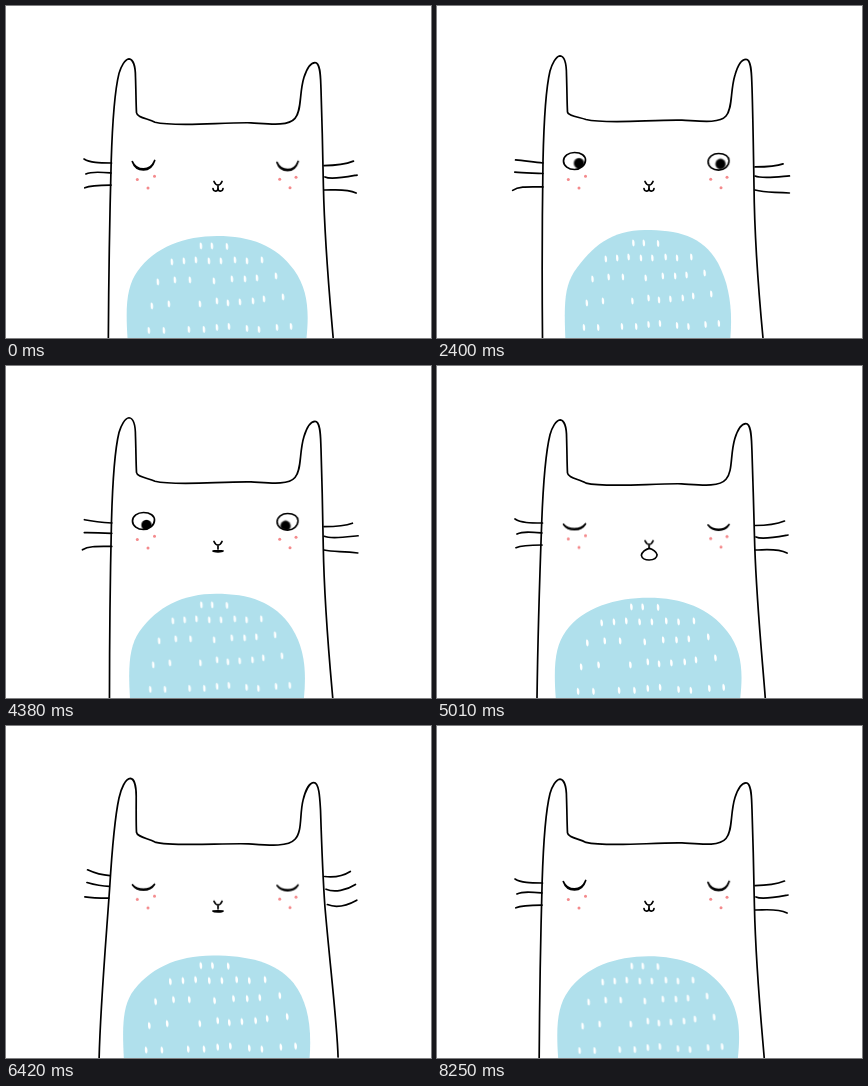
An HTML page without scripts for the animation above (8280 ms loop, 425 by 332 pixels).

```html
<!DOCTYPE html>
<html lang="en">
<head>
<meta charset="utf-8">
<title>Sleepy cat</title>
<style>
html, body { margin: 0; width: 100%; height: 100%; overflow: hidden; background: #fff; }
svg { display: block; width: 100vw; height: 100vh; }
.line { fill: none; stroke: #000; stroke-width: 1.7; stroke-linecap: round; stroke-linejoin: round; }
.open { fill: #fff; }
.pink { fill: #f48a8c; }

.body, .belly, .marks, .whiskers { animation: 8280ms ease-in-out -280ms infinite; }
.body { animation-name: body; }
.belly { animation-name: belly; fill: #b0e0ec; }
.marks { animation-name: marks; transform-origin: 212px 330px; }
.marks path { fill: none; marker: url(#drop); }
.whiskers { animation-name: whiskers; animation-delay: -130ms; }
.lid, .pupil, .side, .nose, .mouth, .smile { animation: 8280ms ease-in-out infinite; }
.lid { animation-name: lid; }
.left .pupil { animation-name: gaze-left; }
.right .pupil { animation-name: gaze-right; }
.side, .nose { animation-name: lift; }
.left { --up: -7px; }
.right { --up: -9px; }
.nose { --up: -8px; --over: 1px; }
.mouth { animation-name: mouth; }
.smile { animation-name: smile; }
.talk { animation: talk 8280ms step-end infinite; }
.smile { animation-timing-function: step-end; }

/* breathing: low, high, low, high, low, high, low, yawn, high, low */
@keyframes body {
  0%, 20.9%, 43.2%, 62.6%, 100% { d: path("M101.5 332C102 280 103 220 105 155C106.5 110 109 84 113 68C115 61 119 54 123 53.7C127 54 129.5 61 129.5 72C130 86 130 98 130.5 107C131 112 142 113 149 117C170 122 215 117 245 117.5C262 118.5 282 121.5 289 113C296 105 293 88 298 72C300 66 304 57.5 309 57.5C315 57.5 314.5 74 315 84C316 115 317 150 317.5 180C319 240 324 290 327.5 332"); }
  10.6%, 32.4%, 49.9%, 87.9% { d: path("M105.5 332C105 280 105 220 106 155C107 108 109 82 113 65C115 58 119 50 123 49.8C127 50 129.5 57 129.5 69C130 84 130 97 130.5 106C131 110 142 111 149 113.5C170 118.5 215 113.5 245 114.2C262 115 282 118 289 110C296 102 293 85 298 69C300 62 304 53.3 309 53.3C315 53.3 314.5 71 315 81C316 112 316.5 150 317 180C317.5 240 322 290 326 332"); }
  69.8%, 73.4% { d: path("M79 332C82 285 93 225 101 170C105 140 108 105 113 80C115 68 120 55.5 126 55.5C130 56 131.5 66 131 76C130.5 88 130 98 130.5 107C131 112 142 114 149 119C160 124 215 121 240 122C262 124 282 125 289 117C297 110 294 92 296 80C298 70 302 60.5 306.5 60.5C311 60.5 313 72 314 88C315 120 317 150 321 180C331 235 342 310 339 330"); }
}
@keyframes belly {
  0%, 20.9%, 43.2%, 62.6%, 100% { d: path("M120 336C117 300 119 280 130 265C147 241 180 231.5 212 231.5C245 231.5 272 242 290 266C306 287 305 310 302 336Z"); }
  10.6%, 32.4%, 49.9%, 87.9% { d: path("M128.5 336C127 300 127 282 137 266C155 240 175 224 208 224C240 224 265 229 281 257C293 280 296 305 293 336Z"); }
  69.8%, 73.4% { d: path("M106 336C104 305 104 285 112 270C127 247 165 236 205 236C245 236 275 244 295 257C313 272 318 300 315 336Z"); }
}
@keyframes marks {
  0%, 20.9%, 43.2%, 62.6%, 100% { transform: translate(-.3px, .7px) scaleX(1.015); }
  10.6%, 32.4%, 49.9%, 87.9% { transform: translate(.5px, -3px) scaleX(.95); }
  69.8%, 73.4% { transform: translate(1px, 2.5px) scaleX(1.17); }
}
@keyframes whiskers {
  0%, 20.9%, 43.2%, 62.6%, 100% { d: path("M78 153C84 157 93 157 105.5 157M80 168C86 165 95 166 105 167M79 181.7C85 179 95 179 105 179M318 159.5C330 159.5 340 158 347.5 155M319 171C325 174 340 171 351 169M318 184C328 184 340 182 350 187"); }
  10.6%, 32.4%, 49.9%, 87.9% { d: path("M78.6 154C87 154.5 96 156 106 157M77.7 166C86 167 95 167 106 167.5M75.5 184.5C82 180 92 181 106 181M318 161C328 161 338 161 346 158M318 170C325 173 340 171 352.5 170M318 184C328 187 335 186 352.5 187"); }
  69.8%, 73.4% { d: path("M83 139C88 143 95 146 103 146M82.5 152C87 154 95 157 102 157M80.5 164.5C86 168 94 168 101 168M319 145.5C328 147 338 144 343.5 139.5M321 160C330 164 341 161 348 153M323 176C332 180 343 177 350 168"); }
}
@keyframes lid {
  0%, 8.4%, 95.4%, 100% { d: path("M-11.2 .5C-9 5.5 -4 7.9 0 7.9C5 7.9 9 5 11.2 -.5C9 6.5 5 9 0 9C-4 9 -9 7 -11.2 .5Z"); }
  10.2%, 57.4%, 80.3%, 93.6% { d: path("M-11 0C-11 -5 -6 -8.5 0 -8.5C7 -8.5 11 -5 11 -1C11 4 6 8.5 0 8.5C-6 8.5 -11 5 -11 0Z"); }
  59.8%, 78.5% { d: path("M-11 4C-8 7.5 -4 8.4 0 8.4C4 8.4 8 7 11 3.5C8 8.3 4 9.2 0 9.2C-4 9.2 -8 8.3 -11 4Z"); }
}
@keyframes gaze-left {
  0%, 34%, 100% { transform: translate(4.5px, 2.2px); }
  36.5%, 47% { transform: translate(5.2px, 2.8px); }
  49.5%, 60% { transform: translate(3px, 4px); }
  75%, 96% { transform: translate(2.5px, 3.6px); }
}
@keyframes gaze-right {
  0%, 34%, 100% { transform: translate(2px, 2.2px); }
  36.5%, 47% { transform: translate(-4.8px, 3px); }
  49.5%, 60% { transform: translate(-2.2px, 4.2px); }
  75%, 96% { transform: translate(-1.4px, 4.2px); }
}
@keyframes lift {
  0%, 59.2%, 78.5%, 100% { transform: none; }
  65.8%, 70% { transform: translate(var(--over, 0px), var(--up)); }
}
@keyframes mouth {
  0%, 36.8%, 48.3%, 57.4%, 77.9%, 100% { d: path("M212 184.8C210 184.8 207.5 185 207 185C207.5 185.6 210 185.8 212 185.8C215 185.8 216.5 185.6 217 185C216.5 185 214 184.8 212 184.8Z"); }
  39.3%, 45.9% { d: path("M212.5 184.4C210 184.4 208.8 186.5 208.8 189C208.8 191.5 210.3 193.6 212.5 193.6C214.7 193.6 216.2 191.5 216.2 189C216.2 186.5 215 184.4 212.5 184.4Z"); }
  66.4%, 70.7% { d: path("M213 175C205 178 196.5 190 196.5 202C196.5 212 203 218.5 212.5 218.5C222 218.5 229.5 211 229.5 200C229.5 190 221 178 213 175Z"); }
}
@keyframes smile { 0%, 77.9% { opacity: 1; } 36.8% { opacity: 0; } }
@keyframes talk { 0%, 77.9% { opacity: 0; } 36.8% { opacity: 1; } }
</style>
</head>
<body>
<svg viewBox="0 0 425 332" preserveAspectRatio="none">
  <defs>
    <marker id="drop" markerUnits="userSpaceOnUse" markerWidth="6" markerHeight="10" viewBox="-3 -5 6 10" orient="0">
      <path d="M-.5 -3.4C.8 -3.4 1.4 -1 1.3 1C1.2 2.8 .8 3.4 .2 3.4C-.8 3.4 -1.2 1.5 -1.2 -.5C-1.2 -2 -1.2 -3.2 -.5 -3.4Z" style="fill:#fff;marker:none"/>
    </marker>
    <clipPath id="eye"><path class="lid"/></clipPath>
    <clipPath id="lips"><path class="mouth"/></clipPath>
  </defs>

  <path class="belly"/>
  <g class="marks">
    <path d="M195 240h11l15 .5"/>
    <path d="M166 256l12-1 12-1 13 1h12l14-1 12 1 15-1"/>
    <path d="M152 276l17-2h15l24 1 18-2h13l12-1 19-2"/>
    <path d="M146 300l17-2h31l17-3 11 2 12-1 13-1 11-2 19-2"/>
    <path d="M143 324.500h15l25-1h15l13-2 12-1 18 2 12 1 18-2 14-1"/>
  </g>
  <path class="line body"/>
  <path class="line whiskers"/>

  <g class="side left">
    <g transform="translate(137.5 155)">
      <path class="line open lid"/>
      <g clip-path="url(#eye)"><circle class="pupil" r="5.2"/></g>
    </g>
    <g class="pink">
      <circle cx="131.300" cy="173.500" r="1.5"/>
      <circle cx="148.500" cy="170.300" r="1.5"/>
      <circle cx="142" cy="182" r="1.5"/>
    </g>
  </g>
  <g class="side right">
    <g transform="translate(281.6 155.8) scale(.95 .98)">
      <path class="line open lid"/>
      <g clip-path="url(#eye)"><circle class="pupil" r="5.4"/></g>
    </g>
    <g class="pink">
      <circle cx="273.700" cy="173.300" r="1.5"/>
      <circle cx="290" cy="171.300" r="1.5"/>
      <circle cx="284" cy="181.800" r="1.5"/>
    </g>
  </g>

  <path class="line nose" d="M208 175.500Q209.500 179 212 179.200Q214.500 179 216 175.500M212 179.200V183"/>
  <path class="line smile" d="M207 182.500C207.500 186 211.500 185.800 212 182.800C212.500 185.800 216.500 186 217 182.500"/>
  <g class="talk">
    <path class="open mouth"/>
    <g clip-path="url(#lips)">
      <path class="pink" d="M190 206Q203 199 212 204Q221 199 235 204V225H190Z"/>
      <path d="M213 203l-2 6" fill="none" stroke="#fff"/>
    </g>
    <path class="line mouth"/>
  </g>
</svg>
</body>
</html>
```
